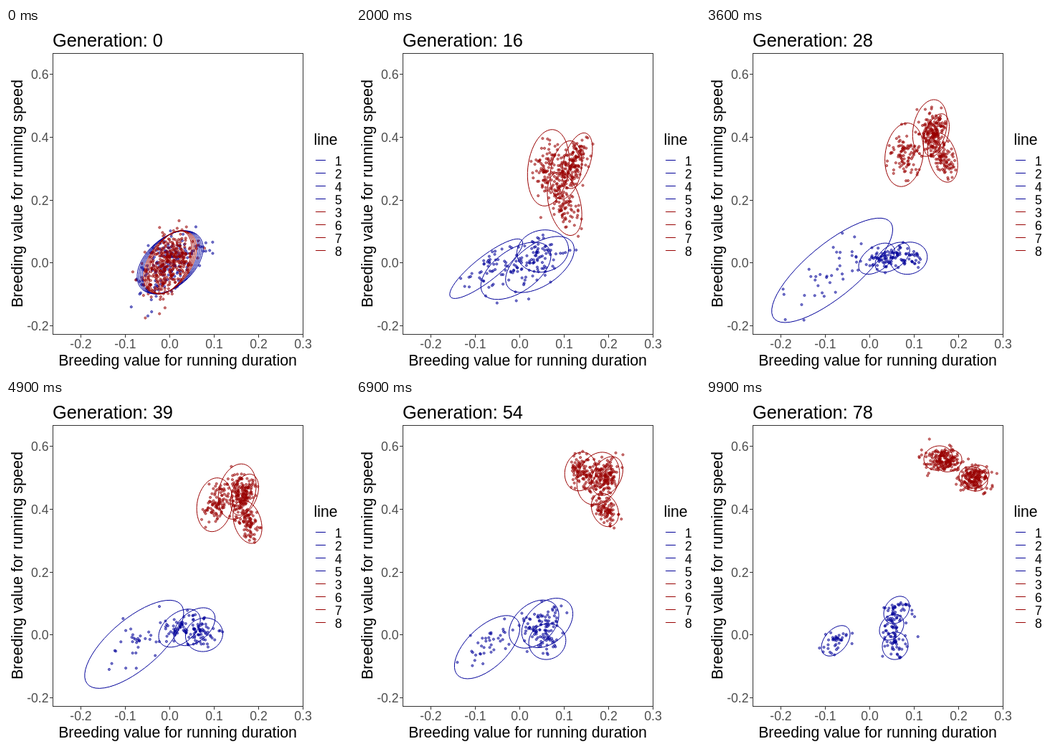
An HTML page with a canvas for the animation above (10 s loop, 480 by 480 pixels).

```html
<!DOCTYPE html>
<html lang="en">
<head>
<meta charset="utf-8">
<title>Breeding values by generation</title>
<style>
  html, body { margin: 0; width: 480px; height: 480px; overflow: hidden; background: #fff; }
  svg, canvas { position: absolute; left: 0; top: 0; }
  text { font-family: "Liberation Sans", Arial, sans-serif; }
  .tick { font-size: 17.6px; fill: #4d4d4d; }
  .mid { text-anchor: middle; }
  .end { text-anchor: end; }
  .key { font-size: 17.6px; }
  .axis { stroke: #333; fill: none; }
</style>
</head>
<body>
<svg width="480" height="480" viewBox="0 0 480 480">
  <text id="title" x="65" y="26" font-size="25.4">Generation: 0</text>
  <rect class="axis" x="65.5" y="35.5" width="349" height="392"/>
  <text class="mid" x="239.5" y="471" font-size="21.3">Breeding value for running duration</text>
  <text class="mid" transform="translate(23 231) rotate(-90)" font-size="21.6">Breeding value for running speed</text>
  <text x="429.5" y="163" font-size="21.3">line</text>
  <g id="marks"></g>
</svg>
<canvas id="plot" width="480" height="480"></canvas>
<script>
const BLUE = '#000099', RED = '#990000';
const FRAMES = 100, FRAME_MS = 100, LAST_GEN = 78;
const KEY_GENS = [16, 28, 54, LAST_GEN];
const title = document.getElementById('title');
const ctx = document.getElementById('plot').getContext('2d');

function drawAxes() {
  let out = '';
  for (let i = -2; i <= 3; i++) {
    const x = Math.round(228 + i * 62) + 0.5;
    out += `<path class="axis" d="M${x} 428v4"/><text class="tick mid" x="${x}" y="447">${(i / 10).toFixed(1)}</text>`;
  }
  for (let i = -1; i <= 3; i++) {
    const y = Math.round(327.4 - i * 87.7) + 0.5;
    out += `<path class="axis" d="M65 ${y}h-4"/><text class="tick end" x="59.5" y="${y + 6.2}">${(i / 5).toFixed(1)}</text>`;
  }
  [1, 2, 4, 5, 3, 6, 7, 8].forEach((name, i) => {
    const y = 185 + i * 18;
    out += `<path d="M432 ${y - 0.5}h14" stroke="${i < 4 ? BLUE : RED}"/>` +
           `<text class="key" x="459" y="${y + 7}">${name}</text>`;
  });
  document.getElementById('marks').innerHTML = out;
}

const mix = (a, b, u) => a + (b - a) * u;

// Height of an ellipse relative to its width
const aspect = (color, gen) => color === RED ? 2.1 - 0.016 * gen : 0.75 + 0.004 * gen;

// Each line starts near the origin and drifts through [x, y, half width];
// its slant (correlation) fades slowly over the generations.
const lines = [];
function addLine(color, lean, ...path) {
  const start = { gen: 0, cx: 229, cy: 327, w: 46 - 2.3 * lines.length, h: 44, r: 0.45 };
  const keys = path.map(([cx, cy, w], i) => {
    const gen = KEY_GENS[i];
    return { gen, cx, cy, w, h: w * aspect(color, gen), r: lean * (1 - gen / 140) };
  });
  lines.push({ color, count: color === RED ? 92 : 38, keys: [start, ...keys] });
}

addLine(BLUE, 0.98, [181, 336, 51], [176, 338, 85], [183, 345, 46], [181, 336, 20]);
addLine(BLUE, 0.6, [223, 339, 49], [238, 322, 25], [248, 313, 35], [266, 293, 18]);
addLine(BLUE, 0.6, [257, 330, 48], [260, 320, 24], [267, 311, 36], [259, 317, 17]);
addLine(BLUE, 0.1, [261, 311, 36], [283, 321, 26], [267, 337, 26], [264, 343, 18]);
addLine(RED, 0.2, [269, 193, 29], [276, 178, 27], [313, 100, 22], [324, 81, 20]);
addLine(RED, 0.3, [294, 196, 22], [312, 140, 24], [338, 110, 30], [339, 85, 18]);
addLine(RED, 0.5, [310, 183, 21], [321, 150, 18], [350, 106, 22], [376, 107, 19]);
addLine(RED, -0.4, [292, 244, 24], [330, 181, 21], [347, 154, 19], [373, 110, 20]);

function random(seed) {
  let n = Math.imul(seed ^ 0x9e3779b9, 0x85ebca6b);
  n = Math.imul(n ^ (n >>> 13), 0xc2b2ae35);
  n = Math.imul(n ^ (n >>> 16), 0x27d4eb2d);
  return ((n ^ (n >>> 15)) >>> 0) / 4294967296;
}

// Two independent normal deviates
function normals(seed) {
  const r = Math.sqrt(-2 * Math.log(1 - random(2 * seed)));
  const a = 2 * Math.PI * random(2 * seed + 1);
  return [r * Math.cos(a), r * Math.sin(a)];
}

function shapeAt(keys, gen) {
  const i = Math.max(1, keys.findIndex(k => k.gen >= gen));
  const a = keys[i - 1], b = keys[i];
  const u = (gen - a.gen) / (b.gen - a.gen);
  const e = {};
  for (const name in a) e[name] = mix(a[name], b[name], u);
  return e;
}

// Maps a point of the unit circle plane into the tilted ellipse
const place = (e, p, q) => [e.cx + e.w * p, e.cy - e.h * (e.r * p + Math.sqrt(1 - e.r * e.r) * q)];

function drawDots(line, e, index, gen) {
  const g = Math.floor(gen), u = gen - g;
  ctx.fillStyle = ctx.strokeStyle = line.color;
  ctx.lineWidth = 0.8;
  for (let i = 0; i < line.count; i++) {
    const id = (index * 100 + i) * 100 + g;
    const a = normals(id), b = normals(id + 1);
    const [x, y] = place(e, mix(a[0], b[0], u) / 2, mix(a[1], b[1], u) / 2);
    ctx.beginPath();
    ctx.arc(x, y, 1.6, 0, 2 * Math.PI);
    ctx.globalAlpha = 0.5;
    ctx.fill();
    ctx.globalAlpha = 0.75;
    ctx.stroke();
  }
}

function drawEllipse(line, e) {
  ctx.globalAlpha = 1;
  ctx.strokeStyle = line.color;
  ctx.lineWidth = 1;
  ctx.beginPath();
  for (let i = 0; i < 51; i++) {
    const t = i / 51 * 2 * Math.PI;
    ctx.lineTo(...place(e, Math.cos(t), Math.sin(t)));
  }
  ctx.closePath();
  ctx.stroke();
}

let shown = -1;
function tick() {
  const frame = Math.floor(performance.now() / FRAME_MS) % FRAMES;
  if (frame !== shown) {
    shown = frame;
    const gen = Math.min(LAST_GEN, frame * LAST_GEN / (FRAMES - 1));
    title.textContent = 'Generation: ' + Math.round(gen);
    ctx.clearRect(0, 0, 480, 480);
    const shapes = lines.map(line => shapeAt(line.keys, gen));
    lines.forEach((line, i) => drawDots(line, shapes[i], i, gen));
    lines.forEach((line, i) => drawEllipse(line, shapes[i]));
  }
  requestAnimationFrame(tick);
}

drawAxes();
tick();
</script>
</body>
</html>
```
